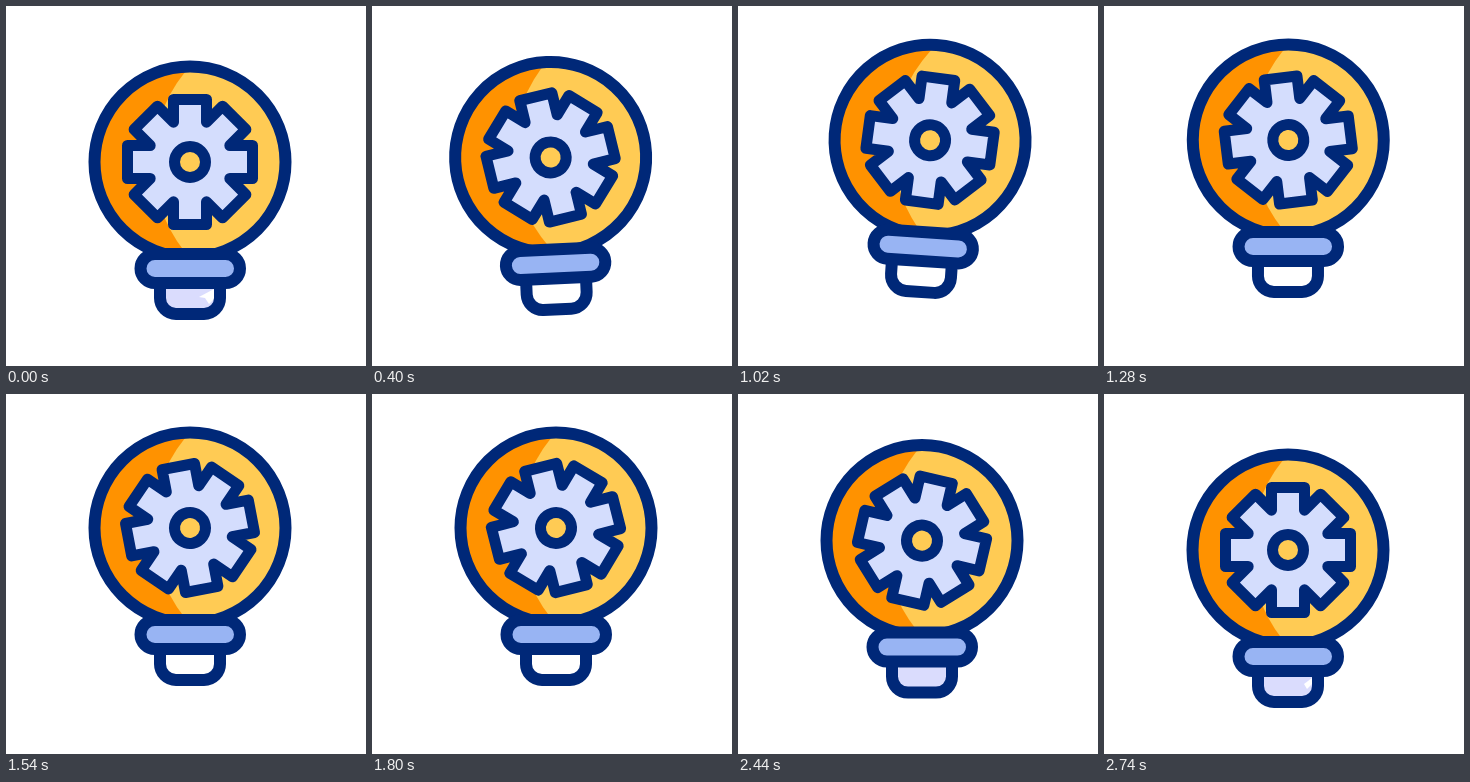
An HTML page with a canvas that plays this animation: 360x360 px, repeating every 2920 ms.

```html
<!DOCTYPE html>
<html lang="en">
<head>
<meta charset="utf-8">
<title>Light bulb with gear</title>
<style>
html, body { margin: 0; width: 100%; height: 100%; overflow: hidden; background: #fff; }
canvas { display: block; width: 100vmin; height: 100vmin; }
</style>
</head>
<body>
<canvas id="stage" width="360" height="360"></canvas>
<script>
const ctx = document.getElementById('stage').getContext('2d');
const LOOP = 2920;
const NAVY = '#002878', YELLOW = '#ffcb54', ORANGE = '#ff9200';
const BLUE = '#98b4f3', PALE = '#d4ddfd', LILAC = '#dadcfd';
const RAD = Math.PI / 180;

const clamp = v => Math.min(1, Math.max(0, v));
const ease = u => (1 - Math.cos(Math.PI * clamp(u))) / 2;

// Keys are [time, value] pairs, eased at every key.
function eased(keys, t) {
  let value = keys[0][1];
  for (let i = 1; i < keys.length; i++) {
    const [t0, v0] = keys[i - 1], [t1, v1] = keys[i];
    value += (v1 - v0) * ease((t - t0) / (t1 - t0));
  }
  return value;
}

// Smooth curve through the keys, at rest on both ends.
function spline(keys, t) {
  const last = keys.length - 1;
  if (t <= keys[0][0]) return keys[0][1];
  if (t >= keys[last][0]) return keys[last][1];
  const slope = i => i === 0 || i === last ? 0 :
    (keys[i + 1][1] - keys[i - 1][1]) / (keys[i + 1][0] - keys[i - 1][0]);
  const i = keys.findIndex(k => k[0] > t) - 1;
  const [t0, v0] = keys[i], [t1, v1] = keys[i + 1];
  const d = t1 - t0, u = (t - t0) / d, w = 1 - u;
  return v0 * (1 + 2 * u) * w * w + slope(i) * d * u * w * w +
    v1 * u * u * (3 - 2 * u) - slope(i + 1) * d * u * u * w;
}

const RISE = [[200, 0], [860, 22], [2080, 22], [2740, 0]];
const TILT = [[200, 0], [860, -12], [1080, 7], [1300, 0]];
const SPIN = [[200, 0], [680, -43], [1020, -86], [1280, -142],
              [1800, -239], [2200, -321], [2740, -360]];

function polygon(points) {
  ctx.beginPath();
  points.forEach(([x, y]) => ctx.lineTo(x, y));
  ctx.closePath();
}

function circle(x, y, r) {
  ctx.beginPath();
  ctx.arc(x, y, r, 0, 2 * Math.PI);
}

function paint(fill, width) {
  ctx.fillStyle = fill;
  ctx.fill();
  ctx.lineWidth = width;
  ctx.stroke();
}

function drawCap(t) {
  const outline = () => {
    ctx.beginPath();
    ctx.roundRect(154, 265, 60, 43, [0, 0, 16, 16]);
  };
  outline();
  ctx.fillStyle = '#fff';
  ctx.fill();

  ctx.save();
  ctx.clip();
  ctx.fillStyle = LILAC;
  if (t < 300 || t >= 2600) {
    ctx.fillRect(154, 265, 60, 43);
    ctx.fillStyle = '#fff';
    if (t < 300) polygon([[193, 291], [208, 283], [210, 291], [203, 298], [199, 292]]);
    else polygon([[200, 290], [208, 284], [209, 289], [203, 295]]);
    ctx.fill();
  } else if (t > 2180) {
    const grow = clamp((t - 2200) / 400);
    ctx.beginPath();
    ctx.ellipse(188 - 4 * grow, 294, 15 + 25 * grow, 8 + 18 * grow, 0, 0, 2 * Math.PI);
    ctx.fill();
  }
  ctx.restore();

  outline();
  ctx.lineWidth = 12;
  ctx.stroke();
}

function drawGlass() {
  circle(184, 156, 95.5);
  ctx.fillStyle = ORANGE;
  ctx.fill();
  ctx.save();
  ctx.clip();
  circle(289, 156, 142);
  ctx.fillStyle = YELLOW;
  ctx.fill();
  ctx.restore();
  circle(184, 156, 95.5);
  ctx.lineWidth = 12;
  ctx.stroke();
}

function drawGear(angle) {
  const half = 16.5, tip = 62.5, root = half * (1 + Math.SQRT2);
  const points = [];
  for (let i = 0; i < 8; i++) {
    const c = Math.cos(i * 45 * RAD), s = Math.sin(i * 45 * RAD);
    for (const [x, y] of [[-half, -root], [-half, -tip], [half, -tip]])
      points.push([x * c - y * s, x * s + y * c]);
  }
  ctx.save();
  ctx.translate(184, 156);
  ctx.rotate(angle * RAD);
  polygon(points);
  paint(PALE, 11);
  circle(0, 0, 15.5);
  paint(YELLOW, 11);
  ctx.restore();
}

function drawPlate() {
  ctx.beginPath();
  ctx.roundRect(134.5, 248, 99.5, 29, 14.5);
  paint(BLUE, 12);
}

function draw(t) {
  ctx.fillStyle = '#fff';
  ctx.fillRect(0, 0, 360, 360);
  ctx.strokeStyle = NAVY;
  ctx.lineJoin = 'round';
  ctx.save();
  ctx.translate(184, 277 - eased(RISE, t));
  ctx.rotate(eased(TILT, t) * RAD);
  ctx.translate(-184, -277);
  drawCap(t);
  drawGlass();
  drawGear(spline(SPIN, t));
  drawPlate();
  ctx.restore();
}

const start = performance.now();
function tick() {
  draw((performance.now() - start) % LOOP);
  requestAnimationFrame(tick);
}
tick();
</script>
</body>
</html>
```
